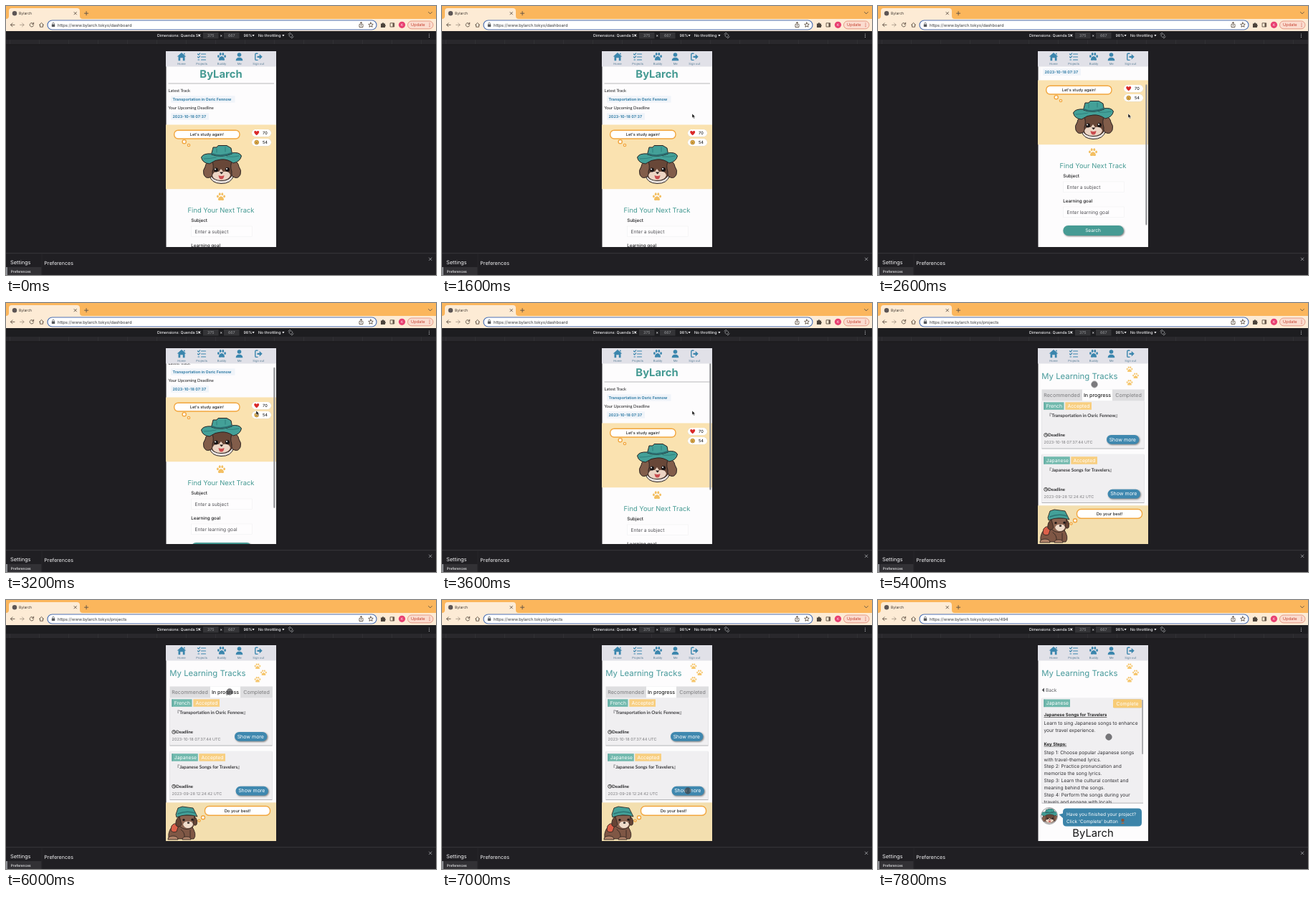
Animation, 600 px wide and 375 px high, one loop 8000 ms. Source, as an HTML page:

```html
<!DOCTYPE html>
<html lang="en">
<head>
<meta charset="utf-8">
<title>ByLarch</title>
<style>
@property --scroll { syntax: "<number>"; inherits: true; initial-value: 0; }
html, body { margin: 0; width: 100%; height: 100%; overflow: hidden; background: #1f1e22; }
svg.stage { display: block; width: 100vw; height: 100vh; }
text { font-family: Inter, Roboto, sans-serif; text-rendering: geometricPrecision; }
.lato { font-family: Lato, "Noto Sans CJK JP", sans-serif; }
.mid { text-anchor: middle; }
.bold { font-weight: 700; }
.teal { fill: #459a93; }
.white { fill: #fff; }
.line { fill: none; stroke-linecap: round; stroke-linejoin: round; }
.tool { stroke: #5e5145; stroke-width: .9; }
.dev text { fill: #f0f0f2; font-size: 5.3px; font-weight: 500; }
.bubble { fill: #fff; stroke: #f2a63e; stroke-width: 1.4; }
.card { fill: #f0eff1; filter: drop-shadow(.4px 1.2px .4px #b4b4b8); }
.button { filter: drop-shadow(1.2px 1.4px .9px #777); }
.soft { filter: drop-shadow(.3px .8px .7px #b6ad96); }
.tag { font-size: 6.8px; fill: #fff; }
.tab { font-size: 7.1px; fill: #7b7b7d; text-anchor: middle; }
.date { font-size: 5.55px; fill: #7c7c7f; }
.more { font-size: 7px; fill: #fff; text-anchor: middle; }
.body { font-size: 6.65px; fill: #303034; }
.under { font-size: 6.05px; font-weight: 700; text-decoration: underline; fill: #222; }

.phone { animation: scroll 8s step-end infinite; }
.content { transform: translateY(calc(var(--scroll) * -1px)); }
.thumb { transform: translateY(calc(var(--scroll) * .7px)); animation: thumb 8s step-end infinite; }
.dashboard { animation: dashboard 8s step-end infinite; }
.projects { animation: projects 8s step-end infinite; }
.list { animation: list 8s step-end infinite; }
.detail { animation: detail 8s step-end infinite; }
.pointer { animation: move 8s infinite; }
.arrow { animation: arrow 8s step-end infinite; }
.touch { animation: touch 8s step-end infinite; }

@keyframes scroll {
  0%, 25% { --scroll: 0; }
  27.5% { --scroll: 18; }
  30% { --scroll: 45; }
  32.5% { --scroll: 62; }
  35%, 37.5% { --scroll: 72; }
  40% { --scroll: 34; }
  42.5% { --scroll: -7; }
  45% { --scroll: -2; }
  47.5%, 100% { --scroll: 0; }
}
@keyframes thumb { 0% { opacity: 0; } 27.5% { opacity: 1; } 50%, 100% { opacity: 0; } }
@keyframes dashboard { 0% { opacity: 1; } 55%, 100% { opacity: 0; } }
@keyframes projects { 0% { opacity: 0; } 55%, 100% { opacity: 1; } }
@keyframes list { 0% { opacity: 0; } 55% { opacity: 1; } 90%, 100% { opacity: 0; } }
@keyframes detail { 0% { opacity: 0; } 90%, 100% { opacity: 1; } }
@keyframes arrow { 0% { opacity: 0; } 15% { opacity: 1; } 47.5%, 100% { opacity: 0; } }
@keyframes touch { 0% { opacity: 0; } 47.5%, 100% { opacity: 1; } }
@keyframes move {
  0%, 15% { transform: translate(362px, 170px); animation-timing-function: steps(1); }
  17.5%, 45% { transform: translate(349px, 150px); animation-timing-function: steps(3); }
  52.5%, 60% { transform: translate(272px, 70px); animation-timing-function: steps(4); }
  70%, 77.5% { transform: translate(312px, 128px); animation-timing-function: steps(3); }
  85%, 90% { transform: translate(343px, 266px); animation-timing-function: steps(3); }
  97.5%, 100% { transform: translate(322px, 191px); }
}
</style>
</head>
<body>
<svg class="stage" viewBox="0 0 600 375" preserveAspectRatio="none">
<defs>
  <clipPath id="screen"><rect x="223.5" y="63.5" width="153.5" height="272.5"/></clipPath>
  <clipPath id="steps"><rect x="228" y="136" width="143" height="147"/></clipPath>
  <clipPath id="face"><circle cx="239" cy="301" r="11"/></clipPath>
  <g id="paw">
    <ellipse cx="-4.6" cy="-.4" rx="1.4" ry="1.9"/><ellipse cx="4.6" cy="-.4" rx="1.4" ry="1.9"/>
    <ellipse cx="-1.8" cy="-3.4" rx="1.4" ry="2"/><ellipse cx="1.8" cy="-3.4" rx="1.4" ry="2"/>
    <path d="M0-.4C2.2-.4 4.2 2.8 4 4.4C3.7 6 1.5 5 0 5S-3.7 6-4 4.4C-4.2 2.8-2.2-.4 0-.4Z"/>
  </g>
  <path id="caret" d="M0 0h3.2l-1.6 2.4z" fill="#f0f0f2"/>
  <g id="clock" class="line" stroke="#222" stroke-width=".8"><circle r="2.5"/><path d="M0-1.4V0l1 .6"/></g>
  <g id="dogHead" stroke="#2b2322" stroke-width="1" stroke-linejoin="bevel">
    <path d="M284 236Q286 247 300 247.5T318 236Z" fill="#e9e2de"/>
    <path d="M286 213Q283 225 284 233Q287 243 300 243.5T317 233Q318 224 314 212Z" fill="#684738"/>
    <path id="ear" d="M287 214Q279 217 278 224Q274 229 276 235Q279 241 284 239Q289 238 288 231Q291 223 287 214Z" fill="#825d4a"/>
    <use href="#ear" transform="matrix(-1 0 0 1 603 0)"/>
    <g stroke="none">
      <path d="M288 236Q290 230 297 231L300 227L303 231Q312 230 313 236Q311 243 300 243T288 236Z" fill="#ecd5c4"/>
      <circle cx="293" cy="228.5" r="3" fill="#191516"/><circle cx="309" cy="228" r="3" fill="#191516"/>
      <circle cx="292" cy="227.4" r="1" fill="#fff"/><circle cx="308" cy="226.9" r="1" fill="#fff"/>
      <path d="M298 231.5h5.4L300.7 234.5Z" fill="#231b1b"/>
      <path d="M296.5 236Q300.5 238 304.5 236Q304 241.5 300.5 241.5T296.5 236Z" fill="#c94c4f"/>
    </g>
    <path d="M272.5 211Q275 205 287 206Q300 211 314 205Q326 203 328.5 209Q327 217 317 219Q309 213 300 214Q292 214 284 220Q274 219 272.5 211Z" fill="#43a098"/>
    <path d="M286.5 207L289 197L294 197L296 194.5L308 194.5L314 198L315.5 206Q300 212 286.5 207Z" fill="#43a098"/>
    <path d="M287 206Q300 211 315 205" class="line" stroke="#2b6d70" stroke-width="2.2"/>
    <path d="M276 213Q285 213 293 211M308 210Q318 211 325 209M294 199v5M306 197v6" class="line" stroke="#2f7f7c" stroke-width="1"/>
  </g>
</defs>

<!-- browser -->
<rect width="600" height="375" fill="#1f1e22"/>
<rect width="600" height="20" fill="#fbb65c"/>
<path d="M0 18Q4 18 4 14V7Q4 3 8 3H99Q103 3 103 7V14Q103 18 107 18H600V35H0Z" fill="#fdebd5"/>
<circle cx="12" cy="10.2" r="3.2" fill="#5c5555"/>
<text x="18" y="12.2" font-size="5.1" fill="#3b342d">Bylarch</text>
<g class="line tool">
  <path d="M95 8.5l3.4 3.4M98.4 8.5L95 11.9M109.5 10.2h5.2M112.1 7.6v5.2M589.5 8.5l2.4 2.4l2.4-2.4"/>
  <path d="M12 26.3H6.5M9 23.8l-2.5 2.5L9 28.8"/>
  <path d="M19.5 26.3H25M22.5 23.8l2.5 2.5l-2.5 2.5" opacity=".5"/>
  <path d="M38 24.6A2.7 2.7 0 1 0 38.5 27M38.6 23.2V25.3H36.5M46.5 26.3L49.5 23.4L52.5 26.3M47.5 26v3.2h4V26"/>
</g>
<rect x="58" y="20" width="459" height="13" rx="6.5" fill="#fff" stroke="#4f73b5" stroke-width="1.2"/>
<rect x="63.8" y="25.5" width="4.4" height="3.4" rx=".5" fill="#55585c"/>
<path d="M64.7 25.5v-1q0-1.4 1.3-1.4t1.3 1.4v1" class="line" stroke="#55585c" stroke-width=".7"/>
<g font-size="5.8" fill="#35373a">
  <text class="dashboard" x="72" y="28.5">https://www.bylarch.tokyo/dashboard</text>
  <text class="list" x="72" y="28.5">https://www.bylarch.tokyo/projects</text>
  <text class="detail" x="72" y="28.5">https://www.bylarch.tokyo/projects/494</text>
</g>
<g class="line tool">
  <path d="M493.8 25.5h-.8v4h5v-4h-.8M495.5 27.5v-5M494 24l1.5-1.5L497 24"/>
  <path d="M509 23l1 2.2l2.3.2l-1.8 1.6l.6 2.3l-2.1-1.3l-2.1 1.3l.6-2.3l-1.8-1.6l2.3-.2Z"/>
  <rect x="536.5" y="23.8" width="5.2" height="5.2"/>
</g>
<path d="M523 24.5h1.8a1.2 1.2 0 0 1 2.4 0H529v1.7a1.2 1.2 0 0 1 0 2.3V30h-6Z" fill="#4c443c"/>
<path d="M539.5 24v5h2v-5Z" fill="#5e5145"/>
<circle cx="552.5" cy="26.3" r="4.6" fill="#e83e70"/>
<text x="552.5" y="28" class="mid white" font-size="4.8">K</text>
<rect x="560.5" y="21" width="35.5" height="10.8" rx="5.4" fill="#fbdccf" stroke="#dc7c65" stroke-width=".7"/>
<text x="565" y="28.4" font-size="5.7" fill="#c5402f">Update</text>
<g fill="#c5402f"><circle cx="591" cy="24" r=".6"/><circle cx="591" cy="26.3" r=".6"/><circle cx="591" cy="28.6" r=".6"/></g>

<!-- device toolbar -->
<g class="dev">
  <rect y="35" width="600" height="12" fill="#1d1d20"/>
  <text x="211" y="43">Dimensions: Quenda SX</text><use href="#caret" x="268" y="40"/>
  <rect x="275" y="37" width="21.5" height="8.5" fill="#343437"/><rect x="304" y="37" width="21.5" height="8.5" fill="#343437"/>
  <text x="285.8" y="43" class="mid" style="fill:#8d8f92">375</text>
  <text x="300.2" y="43" class="mid">×</text>
  <text x="314.8" y="43" class="mid" style="fill:#8d8f92">667</text>
  <text x="331.5" y="43">98%</text><use href="#caret" x="343.5" y="40"/>
  <text x="352" y="43">No throttling</text><use href="#caret" x="385.3" y="40"/>
  <g class="line" stroke="#b7b9bc" stroke-width=".7"><path d="M395 41l2.6-2.6l2.6 2.6l-2.6 2.6ZM394 39.5q.8-2 2.6-2.2M401 42.7q-.8 2-2.6 2.2"/></g>
  <g fill="#b7b9bc"><circle cx="590.5" cy="39" r=".6"/><circle cx="590.5" cy="41.2" r=".6"/><circle cx="590.5" cy="43.4" r=".6"/></g>
  <rect y="47" width="600" height="6.5" fill="#29282c"/>
  <path d="M5 50.3H600" stroke="#38373b" stroke-width="5.5" stroke-dasharray=".6 40.4"/>
  <path d="M0 53.8H600" stroke="#151417" stroke-width=".5"/>
</g>

<!-- settings drawer -->
<rect y="344" width="600" height="31" fill="#201f23"/>
<path d="M0 344.7H600" stroke="#38373b"/>
<rect y="364" width="49.5" height="11" fill="#323135"/>
<rect y="364" width="2" height="11" fill="#8b8d92"/>
<path d="M50 346V375" stroke="#2b2a2e" stroke-width=".7"/>
<g fill="#f2f2f4"><text x="6" y="360.3" font-size="7.4">Settings</text><text x="53.3" y="360.5" font-size="7.1">Preferences</text><text x="6.8" y="371.6" font-size="4.8" font-weight="500">Preferences</text></g>
<path d="M590.3 351l3.6 3.6M593.9 351l-3.6 3.6" class="line" stroke="#a9abae" stroke-width=".8"/>

<!-- phone -->
<g class="phone" clip-path="url(#screen)">
  <rect x="223" y="63" width="155" height="274" fill="#fdfcfd"/>

  <g class="dashboard">
    <g class="content">
      <text x="300" y="100.2" class="mid bold teal" font-size="14.8">ByLarch</text>
      <path d="M226.5 108H374" stroke="#a6a7a9" stroke-width=".8"/>
      <g font-size="5.85" fill="#1f1f21">
        <text class="lato" x="226.5" y="120.3">Latest Track</text><text class="lato" x="226.5" y="143.8">Your Upcoming Deadline</text>
      </g>
      <rect x="230" y="125.3" width="89.5" height="9.4" fill="#f0f4f9"/><rect x="230" y="149.3" width="53" height="9.4" fill="#f0f4f9"/>
      <g class="bold" font-size="5.35" fill="#367fa8"><text x="232.5" y="132.2">Transportation in Osric Fennow</text><text x="232.5" y="156.1">2023-10-18 07:37</text></g>

      <rect x="223" y="165.5" width="155" height="89.7" fill="#fae2b0"/>
      <g class="bubble"><rect x="234.7" y="173.2" width="91.3" height="11.8" rx="5.5"/><circle cx="248.7" cy="189.2" r="2.6"/><circle cx="255" cy="194" r="1.6"/></g>
      <text x="280.3" y="181" class="mid" font-size="5.65">Let's study again!</text>
      <g class="soft white"><rect x="343" y="172" width="27" height="10.3" rx="5"/><rect x="343" y="185" width="27" height="10.3" rx="5"/></g>
      <path d="M349.7 180.2C344.5 176.5 346.2 173.5 348.2 174Q349.3 174.3 349.7 175.3Q350.2 174.3 351.3 174C353.2 173.5 355 176.5 349.7 180.2Z" fill="#da2929"/>
      <circle cx="349.7" cy="190.1" r="2.9" fill="#efbd4f" stroke="#a97a2c" stroke-width=".8"/>
      <use href="#paw" transform="translate(349.7 190) scale(.28)" fill="#96692a"/>
      <text x="358" y="179.2" font-size="5.7">70</text><text x="358" y="192.2" font-size="5.7">54</text>
      <use href="#dogHead"/>

      <use href="#paw" transform="translate(300 265.7)" fill="#f3bf62"/>
      <text x="300" y="288" class="mid teal" font-size="9.4">Find Your Next Track</text>
      <g font-size="6.25" font-weight="500" fill="#1c1c1e"><text x="258.3" y="300.8">Subject</text><text x="258.3" y="335.8">Learning goal</text></g>
      <g fill="#fefdfe" stroke="#f1f0f2" stroke-width=".6"><rect x="258.3" y="307" width="85" height="14.5"/><rect x="258.3" y="342" width="85" height="14.5"/></g>
      <g font-size="6.65" fill="#505155"><text x="263.5" y="317">Enter a subject</text><text x="263.5" y="352">Enter learning goal</text></g>
      <rect class="button" x="258.3" y="368" width="84.5" height="14" rx="7" fill="#469b94"/>
      <text x="300" y="377.2" class="mid white" font-size="6.5">Search</text>
    </g>
    <rect class="thumb" x="373.3" y="66" width="2.2" height="196" rx="1.1" fill="#929396"/>
  </g>

  <g class="projects">
    <text x="228.3" y="106" font-size="11.35" fill="#46999a">My Learning Tracks</text>
    <g fill="#f6c66d"><use href="#paw" transform="translate(351 92.3) scale(.72)"/><use href="#paw" transform="translate(359.5 101.3) scale(.72)"/><use href="#paw" transform="translate(351 110.8) scale(.72)"/></g>
  </g>

  <g class="list">
    <rect class="card" x="228.5" y="136" width="143" height="66.5"/><rect class="card" x="228.5" y="210.5" width="143" height="67.5"/>
    <rect x="228.5" y="120.5" width="143.5" height="15.8" fill="#dedee0"/><rect x="285" y="120.5" width="42" height="15.8" fill="#fff"/>
    <text x="256.5" y="130.5" class="tab">Recommended</text><text x="306" y="130.5" class="tab" style="fill:#222;font-weight:500">In progress</text><text x="349.5" y="130.5" class="tab">Completed</text>
    <g fill="#71b9ad"><rect x="231.5" y="138.3" width="28" height="10.5"/><rect x="231.5" y="214.2" width="36.3" height="10.5"/></g>
    <g fill="#f8cf81"><rect x="261.3" y="138.3" width="36.7" height="10.5"/><rect x="269.3" y="214.2" width="36.7" height="10.5"/></g>
    <path d="M232 138.3v10.5M232 214.2v10.5" stroke="#4a9c93"/>
    <g class="tag"><text x="234.8" y="146">French</text><text x="264.5" y="146">Accepted</text><text x="234.8" y="221.8">Japanese</text><text x="272.5" y="221.8">Accepted</text></g>
    <g font-size="6.4" font-weight="700" fill="#3a3a3d"><text class="lato" x="235.8" y="159">『Transportation in Osric Fennow』</text><text class="lato" x="235.8" y="234.6">『Japanese Songs for Travelers』</text></g>
    <use href="#clock" x="234.2" y="184"/><use href="#clock" x="234.2" y="259.8"/>
    <g font-size="6" font-weight="700" fill="#29292b"><text class="lato" x="237.3" y="186.2">Deadline</text><text class="lato" x="237.3" y="262">Deadline</text></g>
    <text x="231.5" y="196" class="date">2023-10-18 07:37:44 UTC</text><text x="231.5" y="271.8" class="date">2023-09-28 12:24:42 UTC</text>
    <g class="button" fill="#3f88af"><rect x="319" y="184" width="45.3" height="12.7" rx="6.3"/><rect x="320.6" y="259.8" width="45.3" height="12.7" rx="6.3"/></g>
    <text x="341.3" y="192.6" class="more">Show more</text><text x="342.8" y="268.4" class="more">Show more</text>

    <rect x="223" y="282.3" width="155" height="54" fill="#f3dfaf"/>
    <g class="bubble"><rect x="277.5" y="287.5" width="91" height="12.7" rx="5.8"/><circle cx="275" cy="303.2" r="2.5"/><circle cx="269.5" cy="307.6" r="1.5"/></g>
    <text x="323" y="296" class="mid" font-size="5.8">Do your best!</text>
    <g stroke="#342722" stroke-width=".9">
      <path d="M238 312Q225 318 227 333H262Q267 327 259 315Z" fill="#7f5745"/>
      <path d="M231 315Q235 309 241 314L238 323Q231 325 230 320Z" fill="#dc6049"/>
      <path d="M241 300Q238 312 244 317Q252 322 260 317Q266 311 263 300Z" fill="#8a6350"/>
      <path d="M242 302Q236 305 237 314Q241 319 245 313ZM263 302Q268 306 266 313Q263 316 261 311Z" fill="#674435"/>
      <path d="M247 313Q249 308 254 309Q260 308 261 313Q259 318 254 318T247 313Z" fill="#efdccb" stroke="none"/>
      <path d="M237 299L240 290L246 288L261 290L267 302Q252 297 238 303Z" fill="#43a098"/>
      <path d="M240 298Q252 293 264 297" class="line" stroke="#2d7373" stroke-width="1.6"/>
      <path d="M244 320Q250 324 249 331M257 321v10" class="line"/>
      <path d="M226 334q0-5 7-5t7 5ZM246 334q0-4 6-4t6 4Z" fill="#b0836a"/>
      <g fill="#1c1717" stroke="none"><circle cx="248" cy="306.5" r="1.6"/><circle cx="260" cy="306.2" r="1.6"/><ellipse cx="254.5" cy="310.6" rx="1.8" ry="1.2"/></g>
    </g>
  </g>

  <g class="detail">
    <path d="M232 122.5v6l-3.3-3Z" fill="#55565a"/><text x="234" y="128" font-size="6.6" fill="#5b5c60">Back</text>
    <rect class="card" x="228.5" y="136.3" width="141.5" height="146.3"/>
    <rect x="231.5" y="138.5" width="36.5" height="10.7" fill="#71b9ad"/><path d="M232 138.5v10.7" stroke="#4a9c93"/>
    <rect class="soft" x="328" y="138.5" width="40" height="11.7" rx="1.5" fill="#f8cc76"/>
    <text x="234.8" y="146.2" class="tag">Japanese</text><text x="348" y="146.6" class="tag mid">Complete</text>
    <text x="231.5" y="162" class="under">Japanese Songs for Travelers</text><text x="231.5" y="202.7" class="under">Key Steps:</text>
    <g class="body" clip-path="url(#steps)">
      <text x="231.5" y="174.3">Learn to sing Japanese songs to enhance</text>
      <text x="231.5" y="184.3">your travel experience.</text>
      <text x="231.5" y="214.6">Step 1: Choose popular Japanese songs</text>
      <text x="231.5" y="224.5">with travel-themed lyrics.</text>
      <text x="231.5" y="234.4">Step 2: Practice pronunciation and</text>
      <text x="231.5" y="244.3">memorize the song lyrics.</text>
      <text x="231.5" y="254.2">Step 3: Learn the cultural context and</text>
      <text x="231.5" y="264.1">meaning behind the songs.</text>
      <text x="231.5" y="274">Step 4: Perform the songs during your</text>
      <text x="231.5" y="283.9">travels and engage with locals.</text>
    </g>
    <rect x="368.3" y="139" width="1.7" height="76" rx=".8" fill="#a2a3a6"/>
    <circle cx="239" cy="301" r="11.5" fill="#fff" stroke="#8d8d90" stroke-width=".9"/>
    <g clip-path="url(#face)"><use href="#dogHead" transform="translate(107.3 213.2) scale(.44 .4)"/></g>
    <path d="M263 290.5H363Q368 290.5 368 295.5V310.5Q368 315.5 363 315.5H263Q258 315.5 258 310.5V304L252.5 299L258 297.5V295.5Q258 290.5 263 290.5Z" fill="#3c84a9"/>
    <g class="white" font-size="6.5"><text x="263" y="301.4">Have you finished your project?</text><text x="263" y="311.4">Click 'Complete' button</text></g>
    <circle cx="341.5" cy="307" r="2.2" fill="#87543d"/><path d="M339 312q2.5-4 5 0Z" fill="#a56a48"/>
    <text x="300" y="330" class="mid" font-size="14.8" fill="#151516">ByLarch</text>
  </g>

  <g fill="#3b86ad">
    <rect x="223" y="63" width="155" height="21.5" fill="#e1e1e8"/>
    <path d="M245 65l6.3 5.6h-1.8V76.3H246.8V72.3H243.2V76.3H240.5V70.6H238.7ZM248 65.7h1.6v2.4l-1.6-1.2Z"/>
    <path d="M267.5 67l1.2 1.2l2-2.3M267.5 71l1.2 1.2l2-2.3M268 75h1.6M272.5 67H278.5M272.5 71H278.5M272.5 75H278.5" class="line" stroke="#3b86ad" stroke-width="1.2"/>
    <use href="#paw" transform="translate(301 70.5)"/>
    <circle cx="325.5" cy="68" r="2.8"/><path d="M320.7 76.3Q320.7 71.7 325.5 71.7T330.3 76.3Z"/>
    <path d="M351 66.2H349Q347.8 66.2 347.8 67.4V74.2Q347.8 75.4 349 75.4H351" class="line" stroke="#3b86ad" stroke-width="1.4"/>
    <path d="M350.5 69.7H353.7V67L357.7 70.8L353.7 74.6V71.9H350.5Z"/>
    <g class="mid" font-size="4.1" fill="#587d95"><text x="245" y="81.5">Home</text><text x="273" y="81.5">Projects</text><text x="301" y="81.5">Buddy</text><text x="325.7" y="81.5">Me</text><text x="352.3" y="81.5">Sign out</text></g>
  </g>
</g>

<g class="pointer">
  <path class="arrow" d="M0 0V6L1.4 4.8L2.4 7L3.5 6.5L2.6 4.4H4.4Z" fill="#111" stroke="#fff" stroke-width=".5"/>
  <circle class="touch" r="4.4" fill="#3c3c40" fill-opacity=".68" stroke="#4a4a4e" stroke-opacity=".5" stroke-width=".6"/>
</g>
</svg>
</body>
</html>
```
